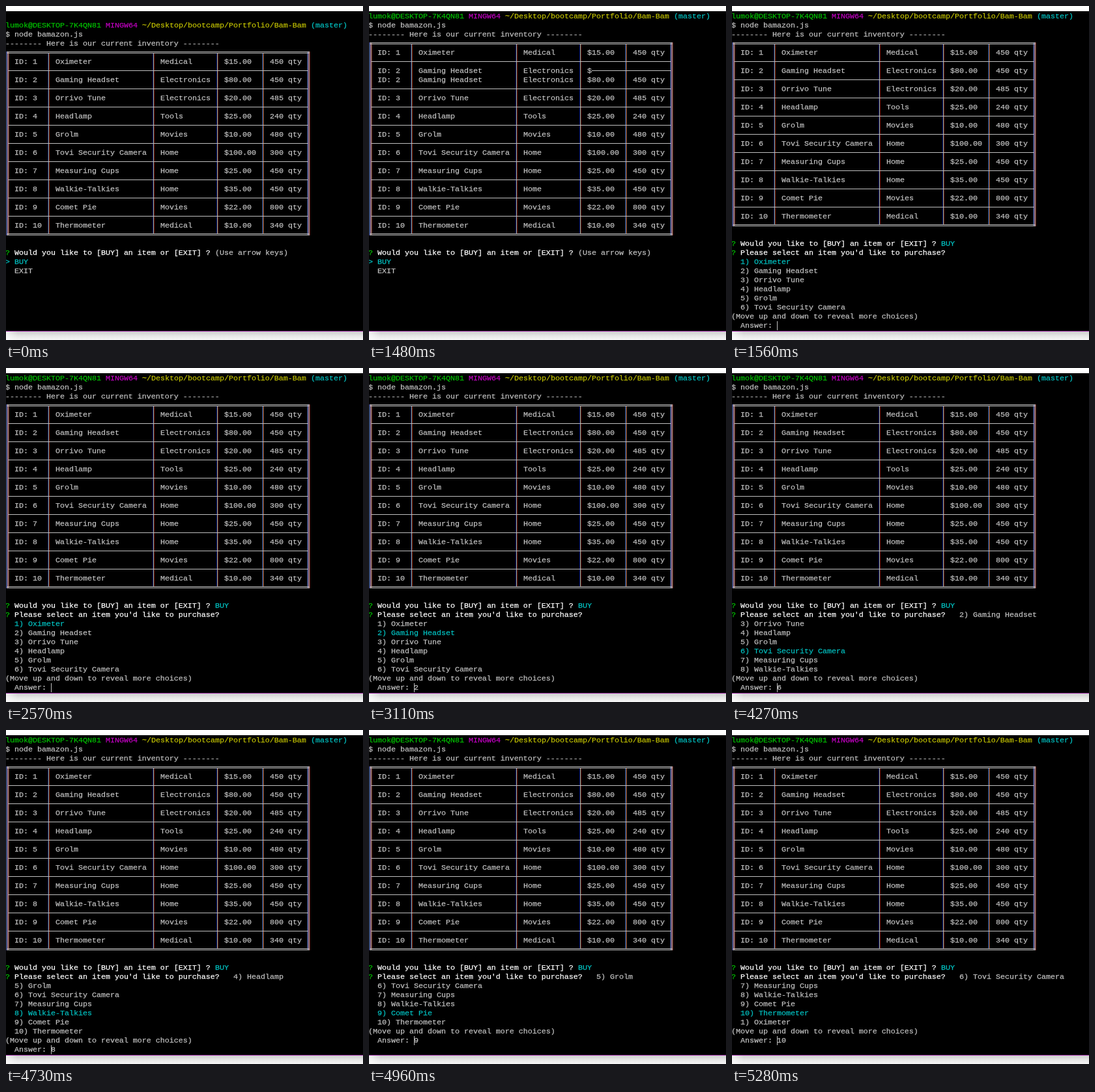
Animation, 548 px wide and 514 px high, one loop 5.83 s. Source, as an HTML page:

```html
<!DOCTYPE html>
<html lang="en">
<head>
<meta charset="utf-8">
<title>Terminal inventory</title>
<style>
html, body { margin: 0; width: 100%; height: 100%; overflow: hidden; background: #fff; }
svg { display: block; width: 548px; height: 514px; }
text { font: 11.665px "Liberation Mono", monospace; white-space: pre; stroke-width: .25px; }
rect { shape-rendering: crispEdges; }
.fringe { mix-blend-mode: screen; }
</style>
</head>
<body>
<svg viewBox="0 0 548 514" xmlns="http://www.w3.org/2000/svg">
  <defs>
    <linearGradient id="shade" x1="0" y1="0" x2="0" y2="1">
      <stop offset="0" stop-color="#cecece"/>
      <stop offset=".5" stop-color="#e6e6e6"/>
      <stop offset="1" stop-color="#f6f6f6"/>
    </linearGradient>
    <linearGradient id="corner">
      <stop offset="0" stop-color="#fff" stop-opacity=".65"/>
      <stop offset="1" stop-color="#fff" stop-opacity="0"/>
    </linearGradient>
    <clipPath id="above"><path d="M0 0H548V93H342V107H0Z"/></clipPath>
    <clipPath id="below"><path d="M342 93H548V514H0V107H342Z"/></clipPath>
  </defs>
  <rect width="548" height="514" fill="#fff"/>
  <rect y="501" width="548" height="13" fill="url(#shade)"/>
  <rect y="501" width="18" height="13" fill="url(#corner)"/>
  <rect y="8" width="548" height="492" fill="#000"/>
  <rect y="500" width="548" height="1" fill="#a02aa8"/>
  <g id="screen"></g>
</svg>
<script>
const LOOP = 5830, CELL = 7, LINE = 14;
const GREY = '#bfbfbf', WHITE = '#fff', GREEN = '#00bf00', CYAN = '#00bfbf',
      PURPLE = '#bf00bf', YELLOW = '#bfbf00';

const items = [
  ['Oximeter', 'Medical', '$15.00', 450],
  ['Gaming Headset', 'Electronics', '$80.00', 450],
  ['Orrivo Tune', 'Electronics', '$20.00', 485],
  ['Headlamp', 'Tools', '$25.00', 240],
  ['Grolm', 'Movies', '$10.00', 480],
  ['Tovi Security Camera', 'Home', '$100.00', 300],
  ['Measuring Cups', 'Home', '$25.00', 450],
  ['Walkie-Talkies', 'Home', '$35.00', 450],
  ['Comet Pie', 'Movies', '$22.00', 800],
  ['Thermometer', 'Medical', '$10.00', 340]
];

// Times of the key presses that move the selection down.
const presses = [3110, 3410, 3730, 3960, 4270, 4500, 4730, 4960, 5280];

const put = (col, row, str, fill = GREY) =>
  `<text x="${col * CELL - 1}" y="${33 + row * LINE}" fill="${fill}" stroke="${fill}">${str.replace(/>/g, '&gt;')}</text>`;
const box = (x, y, w, h, fill = GREY, cls = '') =>
  `<rect class="${cls}" x="${x}" y="${y}" width="${w}" height="${h}" fill="${fill}"/>`;

// Upright line with the colour fringes of subpixel smoothing.
const upright = (x, y, h) =>
  box(x - 1, y, 1, h, '#00006c', 'fringe') + box(x, y, 1, h, '#8fbf8f') +
  box(x + 1, y, 1, h, '#6c0000', 'fringe');

function table() {
  let out = '';
  for (const x of [1, 3, 463, 465]) out += upright(x, 70, 283);
  for (const x of [65, 226, 324, 394]) out += upright(x, 72, 278);
  for (const y of [70, 350]) out += box(1, y, 465, 1) + box(1, y + 2, 465, 1);
  items.forEach(([name, kind, price, qty], i) => {
    const row = 4 + 2 * i;
    out += put(2, row, 'ID: ' + (i + 1)) + put(11, row, name) + put(34, row, kind) +
           put(48, row, price) + put(58, row, qty + ' qty');
    if (i) out += box(3, 71 + i * 28, 461, 1);
  });
  return out;
}

const board =
  put(0, 0, 'lumok@DESKTOP-7K4QN81', GREEN) + put(22, 0, 'MINGW64', PURPLE) +
  put(30, 0, '~/Desktop/bootcamp/Portfolio/Bam-Bam', YELLOW) + put(67, 0, '(master)', CYAN) +
  put(0, 1, '$ node bamazon.js') +
  put(0, 2, '-------- Here is our current inventory --------') +
  table();

const scrolled = `<g transform="translate(0 ${-LINE})">${board}</g>`;

const ask = (row, str) => put(0, row, '?', GREEN) + put(2, row, str, WHITE);
const question = row => ask(row, 'Would you like to [BUY] an item or [EXIT] ?');

const start = board + question(25) + put(46, 25, '(Use arrow keys)') +
  put(0, 26, '> BUY', CYAN) + put(2, 27, 'EXIT');

const torn = `<g clip-path="url(#above)">${scrolled}</g><g clip-path="url(#below)">${start}</g>`;

function choose(sel, answer, cursor) {
  let out = scrolled + question(24) + put(46, 24, 'BUY', CYAN) +
    ask(25, "Please select an item you'd like to purchase?");
  // Seven wrapping slots; slot 0 is the blank that ends the prompt line.
  const top = Math.max(0, sel - 4);
  let row = 25;
  for (let i = top; i < top + 7; i++) {
    const n = i % (items.length + 1);
    if (n) out += put(row === 25 ? 50 : 2, row, `${n}) ${items[n - 1][0]}`, n === sel ? CYAN : GREY);
    if (n || i === 0) row++;
  }
  out += put(0, row, '(Move up and down to reveal more choices)') +
    put(2, row + 1, 'Answer: ' + answer);
  if (cursor) out += box(69, 23 + (row + 1) * LINE, 1, LINE);
  return out;
}

function picture(t) {
  if (t < 1480) return start;
  if (t < 1560) return torn;
  const count = presses.filter(p => t >= p).length;
  const hidden = (t >= 2020 && t < 2570) || (t >= 3030 && t < 3110);
  return choose(count + 1, count ? count + 1 : '', !hidden);
}

const screen = document.getElementById('screen');
let shown = '';
function draw() {
  const next = picture(performance.now() % LOOP);
  if (next !== shown) screen.innerHTML = shown = next;
  requestAnimationFrame(draw);
}
draw();
</script>
</body>
</html>
```
